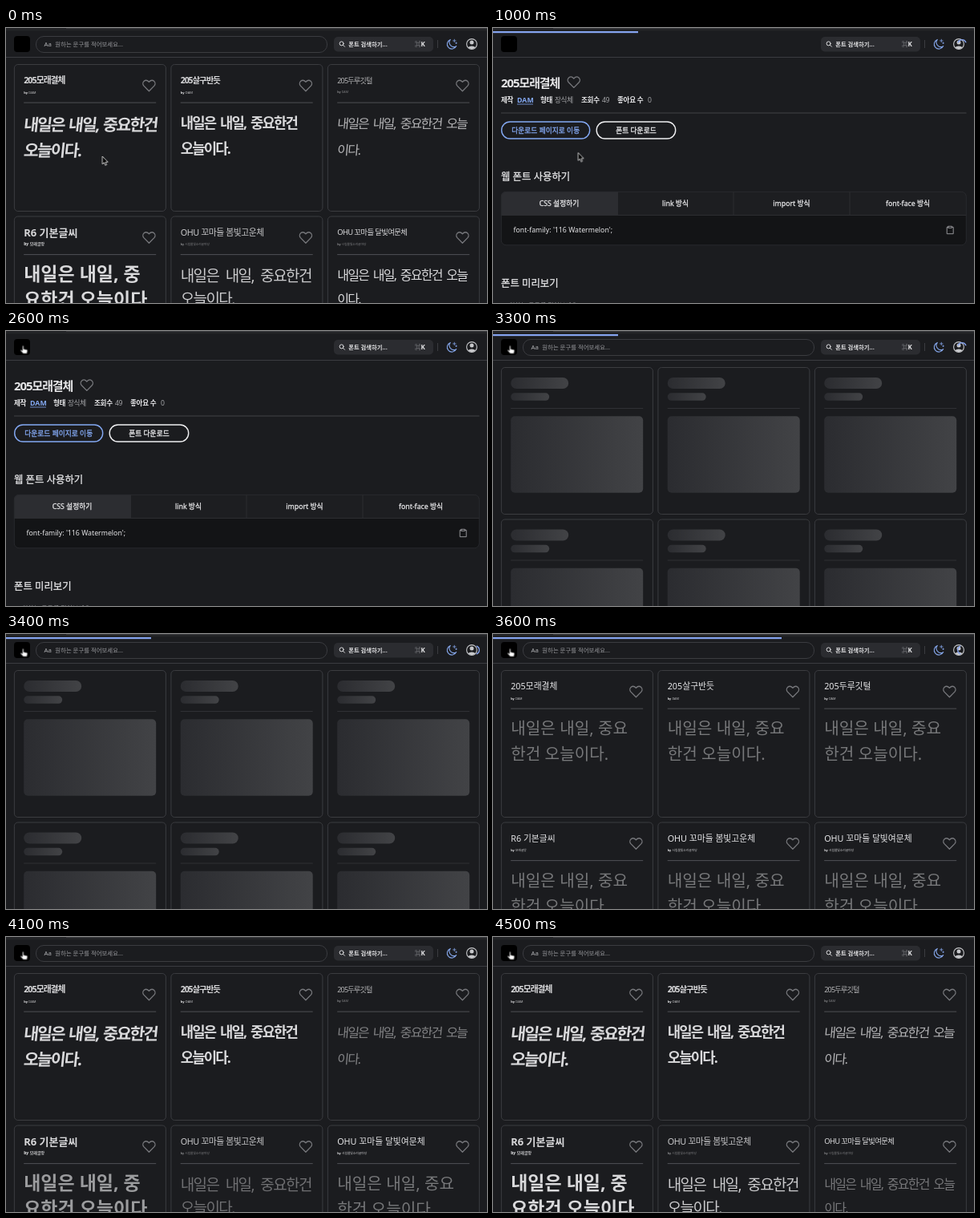
These frames come from a looping animation (600 by 343 pixels, 4600 ms). An HTML page:

```html
<!DOCTYPE html>
<html lang="ko">
<head>
<meta charset="utf-8">
<title>Font gallery</title>
<style>
  html, body { margin: 0; width: 100%; height: 100%; overflow: hidden; background: #1b1c1f; }
  svg { display: block; width: 600px; height: 343px; }
  text {
    font-family: 'Noto Sans', 'Noto Sans CJK KR', 'Noto Sans CJK JP', sans-serif;
    color: #e6e6e8; fill: currentColor; white-space: pre;
  }
  .medium { stroke: currentColor; stroke-width: .28px; }
  .line { fill: none; stroke: #3b3c40; }
  .icon { fill: none; stroke-linecap: round; stroke-linejoin: round; }
</style>
</head>
<body>
<svg id="stage" viewBox="0 0 600 343" xmlns="http://www.w3.org/2000/svg">
  <defs>
    <linearGradient id="shade"><stop stop-color="#2b2c30"/><stop offset="1" stop-color="#424346"/></linearGradient>
    <clipPath id="panel"><rect x="10" y="204" width="580.5" height="67" rx="6"/></clipPath>
  </defs>
  <rect width="600" height="343" fill="#1b1c1f"/>
  <g id="home"></g>
  <g id="skeleton"></g>
  <g id="detail"></g>
  <g id="header">
    <rect width="600" height="3.5" fill="#232427"/>
    <rect x="75" width="525" height="1" fill="#3b3b3e"/>
    <path class="line" d="M0 36.5H600" stroke="#303134"/>
    <rect x="10" y="10" width="20" height="20" rx="4"/>
    <rect x="409" y="11" width="124" height="18.5" rx="5" fill="#2b2c30"/>
    <g class="icon" stroke="#dcdcde"><circle cx="418.6" cy="19.4" r="2.5"/><path d="M420.5 21.3l2 2"/></g>
    <path d="M538.5 15V25" stroke="#3b3c40"/>
    <g class="icon" stroke="#84a5e8" stroke-width="1.1">
      <path d="M554.3 14.4a6 6 0 1 0 7.4 8.2a5.6 5.6 0 0 1 -7.4 -8.2z"/>
      <path d="M559.3 14.2v3.4M557.6 15.9h3.4M561.6 18v1.6M560.8 18.8h1.6" stroke-width=".8"/>
    </g>
    <g fill="#c6c7ca">
      <circle cx="581" cy="20" r="6.4" fill="none" stroke="#c6c7ca" stroke-width="1.1"/>
      <circle cx="581" cy="18" r="2.5"/>
      <path d="M576.4 24.3a5.2 3.6 0 0 1 9.2 0a6.4 6.4 0 0 1 -9.2 0z"/>
    </g>
  </g>
  <g id="prompt"><rect class="line" x="37.5" y="10.5" width="363" height="20" rx="9.5"/></g>
  <rect id="bar" y="4" width="600" height="2.2" fill="#86a4f0"/>
  <g id="spinner" transform="translate(585 20)">
    <path id="arc" class="icon" d="M-4.8 -2.3A5.3 5.3 0 0 1 4.8 -2.3" stroke="#86a4f0" stroke-width="1.4"/>
  </g>
  <g id="cursor" stroke-linejoin="round">
    <path id="arrow" d="M0 0V9.8L2.2 7.8L3.7 11.3L5.3 10.6L3.9 7.2H6.9Z" fill="#000" stroke="#f2f2f2" stroke-width=".8"/>
    <path id="hand" d="M0 .8C0 -.5 1.7 -.5 1.7 .8V3.9L5.4 4.7C6.3 5 6.4 5.6 6.3 6.4L5.7 9.8H1.1L-2.2 6.2C-2.7 5.3 -1.6 4.6 -.9 5.3L0 6.1Z" fill="#fff" stroke="#111" stroke-width=".7"/>
  </g>
</svg>
<script>
const LOOP = 4600;
const $ = id => document.getElementById(id);

function add(parent, tag, attrs) {
  const el = document.createElementNS('http://www.w3.org/2000/svg', tag);
  for (const key in attrs) el.setAttribute(key, attrs[key]);
  return parent.appendChild(el);
}

// Text placed by its left edge and its vertical middle.
function label(parent, x, mid, str, size, attrs = {}) {
  const el = add(parent, 'text', { x, y: mid + size * 0.37, 'font-size': size + 'px', ...attrs });
  el.textContent = str;
  return el;
}

// Holds each value from its time in ms until the next one.
function step(el, prop, marks) {
  const frames = Object.entries(marks)
    .filter(([t]) => t < LOOP)
    .map(([t, value]) => ({ offset: t / LOOP, [prop]: value, easing: 'steps(1, end)' }));
  el.animate(frames, { duration: LOOP, iterations: Infinity });
}

const heart = (parent, x, y) => add(parent, 'path', {
  class: 'icon', stroke: '#77787c', 'stroke-width': 1.3, transform: `translate(${x} ${y})`,
  d: 'M0 7L-6.5 .4C-10 -3.6 -4.4 -9.4 0 -4.4C4.4 -9.4 10 -3.6 6.5 .4Z'
});

// Header texts
label($('header'), 427.3, 20, '폰트 검색하기...', 7.3, { 'font-weight': 600 });
label($('header'), 510, 20, '⌘', 7.6, { style: 'color:#a5a6aa' });
label($('header'), 517.5, 20, 'K', 8, { 'font-weight': 600 });
label($('prompt'), 47.5, 20.2, 'Aa', 7.8, { style: 'color:#b0b1b4' });
label($('prompt'), 61.3, 20.2, '원하는 문구를 적어보세요...', 7.4, { style: 'color:#96979b' });

// Gallery: title and body hold size, letter gap and word gap.
const fonts = [
  { name: '205모래결체', by: 'DAM', weight: 900, title: [10.8, -1], body: [20.5, -2, 2], mids: [120, 152.5],
    skew: -6, lines: ['내일은 내일, 중요한건', '오늘이다.'], load: 3700 },
  { name: '205살구반듯', by: 'DAM', weight: 700, title: [10.4, -1], body: [17.8, -1.85, 3], mids: [118, 150],
    lines: ['내일은 내일, 중요한건', '오늘이다.'], load: 3700 },
  { name: '205두루깃털', by: 'DAM', weight: 100, title: [9.2, -0.9], body: [16, -1.75, 3.2], mids: [119.5, 152],
    skew: -5, faint: 1, tone: '#b4b4b6', lines: ['내일은 내일, 중요한건 오늘', '이다.'], load: 4000 },
  { name: 'R6 기본글씨', by: '모래글방', weight: 700, title: [13, 0], body: [23, 0, 0], mids: [117, 149],
    lines: ['내일은 내일, 중', '요한건 오늘이다.'], load: 4000 },
  { name: 'OHU 꼬마들 봄빛고운체', by: '시립물빛소리글마당', weight: 400, title: [10.8, -0.4], body: [19, -1.6, 5], mids: [119, 148.5],
    faint: 1, tone: '#cacacc', lines: ['내일은 내일, 중요한건', '오늘이다.'], load: 4100 },
  { name: 'OHU 꼬마들 달빛여문체', by: '시립물빛소리글마당', weight: 500, title: [9.4, -0.6], body: [16, -1.75, 3.2], mids: [119, 148.5],
    faint: 1, lines: ['내일은 내일, 중요한건 오늘', '이다.'], load: 4500 }
];

function byline(parent, x, mid, name, size, faint, weight) {
  label(parent, x, mid, 'by', size, { 'font-weight': 700, opacity: faint ? 0.55 : 1 });
  label(parent, x + size * 1.5, mid, name, size, { 'font-weight': weight, opacity: faint ? 0.5 : 0.85 });
}

function frame(parent, x, y) {
  add(parent, 'rect', { class: 'line', x: x + 0.2, y: y + 0.2, width: 189, height: 183, rx: 4.5 });
}

fonts.forEach((font, i) => {
  const x = 10.2 + 195.5 * (i % 3), row = 189.5 * (i > 2), y = 45.3 + row, left = x + 12;
  const [titleSize, titleGap] = font.title, [bodySize, bodyGap, wordGap] = font.body;
  const style = `color:${font.tone || '#d9d9db'}`;

  const card = add($('home'), 'g');
  frame(card, x, y);
  heart(card, x + 168.2, y + 26.4);
  add(card, 'path', { d: `M${left} ${y + 47.8}h165`, stroke: '#505155' });

  const ready = add(card, 'g'), plain = add(card, 'g');
  label(ready, left, 65.5 + row, font.name, titleSize,
    { 'font-weight': font.weight, 'letter-spacing': titleGap, style });
  byline(ready, left, 80 + row, font.by, i === 3 ? 5 : font.faint ? 3.7 : 4.1, font.faint, i === 3 ? 700 : 500);
  const body = add(ready, 'g');
  font.lines.forEach((line, n) => {
    const mid = font.mids[n] + row, skew = font.skew || 0;
    label(body, 0, 0, line, bodySize, {
      'font-weight': font.weight, 'letter-spacing': bodyGap, 'word-spacing': wordGap, style,
      transform: `translate(${left} ${mid}) skewX(${skew})`
    });
  });

  label(plain, left, 65.5 + row, font.name, 10.8, { 'font-weight': 400 });
  byline(plain, left, 80.5 + row, font.by, 3.8, false, 400);
  ['내일은 내일, 중요', '한건 오늘이다.'].forEach((line, n) =>
    label(plain, left, 118 + 32 * n + row, line, 20.2, { 'font-weight': 300, style: 'color:#77787a' }));

  step(ready, 'opacity', { 0: 1, 3500: 0, [font.load]: 1 });
  step(plain, 'opacity', { 0: 0, 3500: 1, [font.load]: 0 });
  step(body, 'opacity', { 0: 1, 3500: 0, [font.load]: 0.48, [font.load + 100]: 0.68, [font.load + 200]: 0.88, [font.load + 300]: 1 });

  const ghost = $('skeleton');
  frame(ghost, x, y);
  add(ghost, 'path', { d: `M${left} ${96.5 + row}h165`, stroke: '#303135' });
  [[58, 72, 14, 7], [77.3, 48, 9.5, 4.7], [106.3, 165, 95.5, 5]].forEach(([top, width, height, rx]) =>
    add(ghost, 'rect', { x: left, y: top + row, width, height, rx, fill: 'url(#shade)' }));
});

// Detail page
const page = $('detail');
label(page, 10, 68, fonts[0].name, 15, { 'font-weight': 900, 'letter-spacing': -1.1 });
heart(page, 100.8, 67.4);
[[10, '제작', 1], [59, '형태', 1], [77, '장식체'], [110, '조회수', 1], [136, '49'], [155, '좋아요 수', 1], [193, '0']]
  .forEach(([x, str, strong]) => label(page, x, 90, str, 8.6, {
    'font-weight': strong ? 800 : 500, 'letter-spacing': -0.3, style: `color:${strong ? '#e6e6e8' : '#a4a5a8'}`
  }));
label(page, 30, 90, 'DAM', 8.8, { 'font-weight': 600, style: 'color:#84a9f3' });
add(page, 'path', { d: 'M30 95H50', stroke: '#84a9f3', 'stroke-width': 0.8 });
add(page, 'path', { d: 'M10 106H590.5', stroke: '#424347' });

[[10.7, 110, '다운로드 페이지로 이동', '#84a9f3'], [129.2, 98.5, '폰트 다운로드', '#f0f0f2']].forEach(([x, width, str, color]) => {
  add(page, 'rect', { x, y: 117, width, height: 21, rx: 10.5, fill: 'none', stroke: color, 'stroke-width': 1.4 });
  label(page, x + width / 2, 127.4, str, 8.75, { 'text-anchor': 'middle', class: 'medium', style: `color:${color}` });
});
label(page, 10, 185, '웹 폰트 사용하기', 12.4, { class: 'medium' });
label(page, 10, 318, '폰트 미리보기', 12.4, { class: 'medium' });

const panel = add(page, 'g', { 'clip-path': 'url(#panel)' });
add(panel, 'rect', { x: 10, y: 204, width: 581, height: 29.5, fill: '#1d1e21' });
add(panel, 'rect', { x: 10, y: 204, width: 145.5, height: 29.5, fill: '#2c2d31' });
add(panel, 'rect', { x: 10, y: 233.5, width: 581, height: 38, fill: '#131416' });
add(panel, 'path', { d: 'M10 233.5H591M155.5 204v29M300 204v29M445 204v29', stroke: '#2c2d31' });
add(page, 'rect', { class: 'line', x: 10.3, y: 204.3, width: 580, height: 66.5, rx: 6, style: 'stroke:#292a2e' });
['CSS 설정하기', 'link 방식', 'import 방식', 'font-face 방식'].forEach((str, i) =>
  label(page, 82.5 + 145 * i, 218.3, str, 8.75, { 'text-anchor': 'middle', class: 'medium' }));
label(page, 25.5, 252, "font-family: '116 Watermelon';", 8.75);
add(page, 'path', { class: 'icon', stroke: '#a2a3a6', 'stroke-width': 0.9,
  d: 'M568 248.3h-1.8v8.4h8v-8.4h-1.8M568 247.3h4.4v2h-4.4z' });
label(page, 20, 346.5, '원하는 문구를 적어보세요...', 8, { style: 'color:#96979b' });

// Page changes
step($('home'), 'opacity', { 0: 1, 800: 0, 3500: 1 });
step($('detail'), 'opacity', { 0: 0, 800: 1, 3200: 0 });
step($('skeleton'), 'opacity', { 0: 0, 3200: 1, 3500: 0 });
step($('prompt'), 'opacity', { 0: 1, 800: 0, 3200: 1 });

// Loading bar and spinner
const grow = {
  0: 0, 600: 0.04, 700: 0.08, 800: 0.13, 900: 0.2, 1000: 0.301, 1100: 0.34, 1200: 0.7, 1300: 1, 1500: 0,
  2900: 0.04, 3000: 0.08, 3100: 0.13, 3200: 0.18, 3300: 0.26, 3400: 0.301, 3500: 0.34, 3600: 0.6, 3700: 0.9, 3800: 1
};
for (const t in grow) grow[t] = `scaleX(${grow[t]})`;
step($('bar'), 'transform', grow);
step($('bar'), 'opacity', { 0: 1, 1400: 0.5, 1500: 0, 2900: 1, 3800: 0.85, 3900: 0.4, 4000: 0 });
step($('spinner'), 'opacity', { 0: 0, 600: 1, 1500: 0, 2900: 1, 4000: 0 });

const turn = { 0: 'rotate(0deg)' };
for (let t = 600; t < 4000; t += 100) {
  const angle = t < 2900 ? (t - 1000) * 0.9 : (t - 3400) * 0.9 + 90;
  turn[t] = `rotate(${angle}deg)`;
}
step($('arc'), 'transform', turn);

// Pointer
const path = {
  0: [120.2, 160], 100: [117, 158], 200: [114, 156], 600: [110, 156], 700: [106.2, 155.5],
  1700: [101, 149], 1800: [82, 122], 1900: [57.2, 91.3], 2000: [32, 60], 2100: [15, 40], 2200: [22, 82],
  2300: [27, 121], 2400: [25, 84], 2500: [22, 42], 2600: [20.5, 18.5]
};
for (const t in path) path[t] = `translate(${path[t][0]}px, ${path[t][1]}px)`;
step($('cursor'), 'transform', path);
step($('arrow'), 'opacity', { 0: 1, 2600: 0 });
step($('hand'), 'opacity', { 0: 0, 2600: 1 });
</script>
</body>
</html>
```
